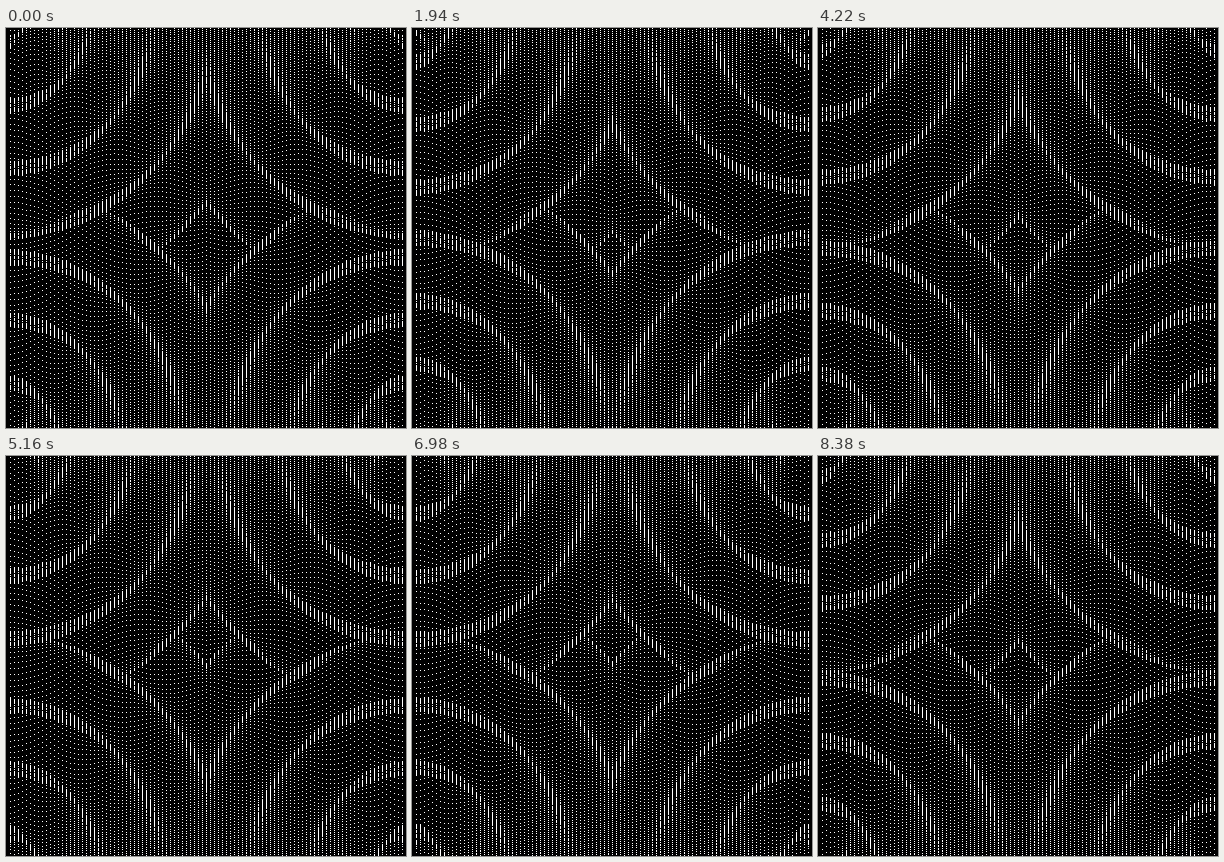
Write an HTML page with a canvas that moves like this. It is 400 px wide and 400 px high and loops after 8480 ms.

```html
<!DOCTYPE html>
<html lang="en">
<head>
<meta charset="utf-8">
<title>Dot ripples</title>
<style>
  html, body { margin: 0; width: 100%; height: 100%; overflow: hidden; background: #000; }
  canvas { display: block; width: 400px; height: 400px; image-rendering: pixelated; }
</style>
</head>
<body>
<canvas id="stage" width="400" height="400"></canvas>
<script>
const SIZE = 400, HALF = SIZE / 2;
const LOOP = 8480, LAST_STEP = 179;
const STEP_X = 4, STEP_Y = 2, MARGIN = 24;
const AMPLITUDE = 20, WAVE = 10, START_PHASE = 1.72;

// Distance the rings have travelled outwards, as [step, pixels]
const TRAVEL = [[0, 0], [41, 207.5], [65, 330.2], [91, 448.8], [110, 545], [149, 734.5], [179, 886.6]];

const ctx = document.getElementById('stage').getContext('2d');

// Steps come in threes that last 20, 100 and 20 ms
function stepAt(ms) {
  const rest = ms % 140;
  const part = rest < 20 ? 0 : rest < 120 ? 1 : 2;
  return Math.min(LAST_STEP, Math.floor(ms / 140) * 3 + part);
}

function travelAt(step) {
  const i = Math.max(1, TRAVEL.findIndex(([s]) => s >= step));
  const [s0, r0] = TRAVEL[i - 1], [s1, r1] = TRAVEL[i];
  return r0 + (r1 - r0) * (step - s0) / (s1 - s0);
}

function draw(step) {
  const phase = START_PHASE - travelAt(step) / WAVE;
  ctx.fillStyle = '#000';
  ctx.fillRect(0, 0, SIZE, SIZE);
  ctx.fillStyle = '#fff';
  for (let x = STEP_X; x <= HALF; x += STEP_X) {
    for (let y = -MARGIN; y <= SIZE + MARGIN; y += STEP_Y) {
      // Each quarter ripples around its own corner
      const dist = Math.hypot(x, y < HALF ? y : SIZE - y);
      const top = Math.round(y + AMPLITUDE * Math.sin(dist / WAVE + phase));
      if (top < 0 || top >= SIZE) continue;
      ctx.fillRect(x, top, 1, 1);
      if (x < HALF) ctx.fillRect(SIZE - x, top, 1, 1);
    }
  }
}

const start = performance.now();
let shown = -1;

function tick() {
  const step = stepAt((performance.now() - start) % LOOP);
  if (step !== shown) {
    draw(step);
    shown = step;
  }
  requestAnimationFrame(tick);
}
tick();
</script>
</body>
</html>
```
